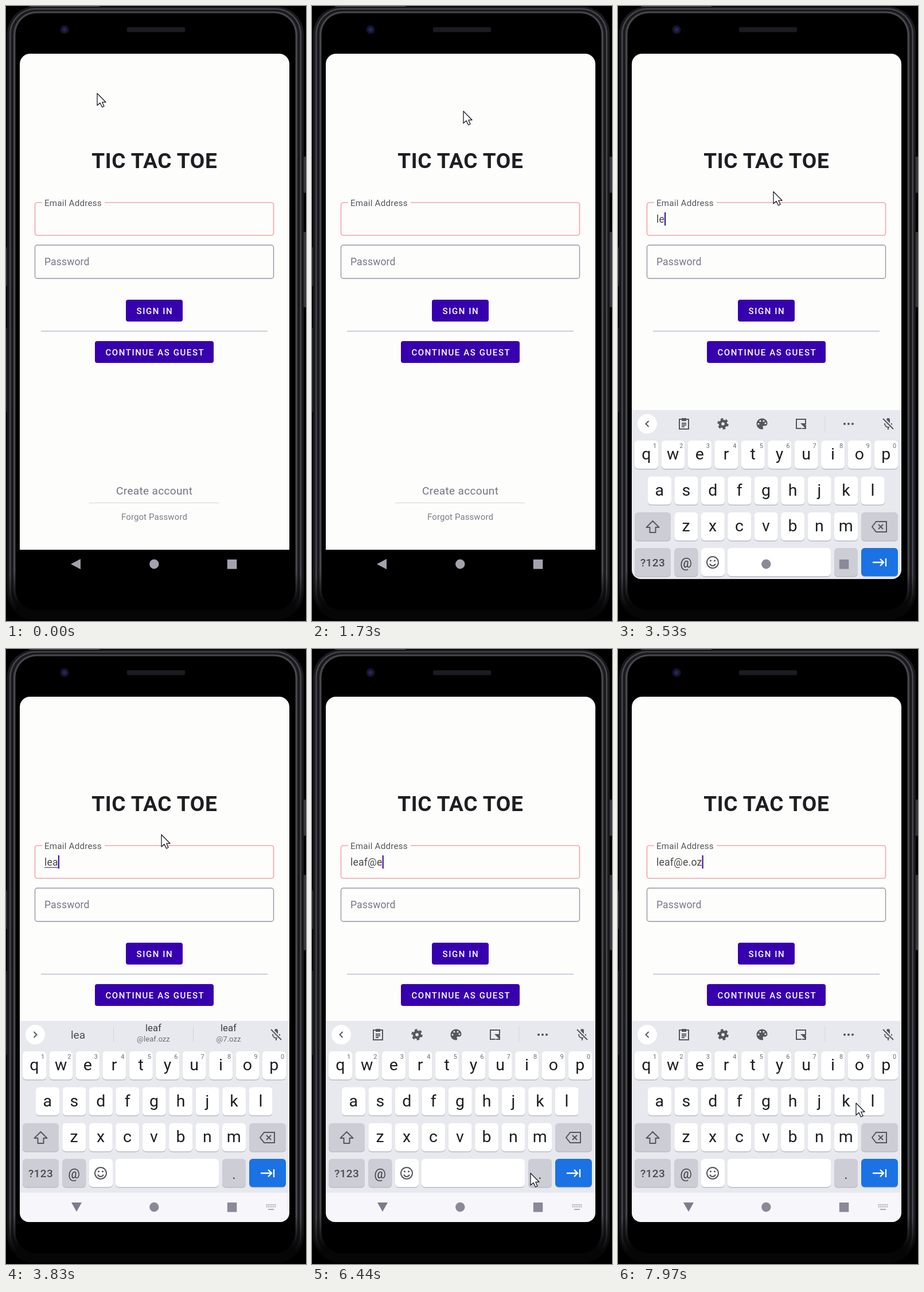
Recreate the animation shown at these times as an HTML page. Size 523 by 1070 pixels, loop 8000 ms.

```html
<!DOCTYPE html>
<html lang="en">
<head>
<meta charset="utf-8">
<title>Sign in</title>
<style>
html, body { margin: 0; width: 100%; height: 100%; overflow: hidden; background: #000; }
svg { display: block; width: 100vw; height: 100vh; }
text { font-family: Roboto, "Open Sans", sans-serif; }
.mid { text-anchor: middle; }
.line { fill: none; stroke: #55575c; stroke-width: 2; }
</style>
</head>
<body>
<svg id="stage" viewBox="0 0 523 1070"></svg>
<script>
const LOOP = 8000;
const stage = document.getElementById('stage');

const rect = (x, y, w, h, r, fill, more = '') =>
  `<rect x="${x}" y="${y}" width="${w}" height="${h}" rx="${r}" fill="${fill}" ${more}/>`;
const text = (x, y, size, fill, s, more = '') =>
  `<text x="${x}" y="${y}" font-size="${size}" fill="${fill}" ${more}>${s}</text>`;
const mid = (x, y, size, fill, s, more = '') => text(x, y, size, fill, s, 'class="mid" ' + more);
const path = (d, more) => `<path d="${d}" ${more}/>`;
const group = (id, body, more = '') => `<g id="${id}" ${more}>${body}</g>`;
const at = (x, y, body) => `<g transform="translate(${x} ${y})">${body}</g>`;

function phone() {
  return rect(0, 0, 523, 1070, 0, '#000') +
    rect(519, 262, 4, 63, 1, '#38383e') + rect(519, 393, 4, 131, 1, '#38383e') +
    rect(0, 420, 1.5, 67, 0, '#33333a') + rect(0, 560, 1.5, 146, 0, '#26262c') +
    rect(40, 0, 123, 1, 0, '#55555c') +
    rect(2, 1, 517, 1067, 48, 'url(#edge)') +
    rect(6, 4, 509, 1060, 45, 'url(#rim)') +
    rect(8.5, 6, 504, 1055, 43, 'url(#edge)') +
    rect(13, 9.5, 495, 1046, 40, 'url(#rim)') +
    rect(16.5, 12.5, 488, 1039, 37, '#000') +
    '<circle cx="102" cy="41" r="7.5" fill="#14142e"/><circle cx="102" cy="41" r="3.5" fill="#26265a"/>' +
    rect(211, 37, 101, 8.5, 2, '#1b1b22');
}

function button(x, y, w, label) {
  return rect(x, y, w, 38, 4, '#3700ae') +
    text(x + 18.5, y + 24.5, 15, '#fff', label, 'font-weight="500" letter-spacing="1.57"');
}

function form() {
  return path('M24 946V101a18 18 0 0 1 18-18H476a18 18 0 0 1 18 18V946Z', 'fill="#fdfdfc"') +
    mid(258.8, 282, 37, '#1e1e22', 'TIC TAC TOE', 'font-weight="700" letter-spacing=".6"') +
    rect(50.5, 342, 416, 57, 4, 'none', 'stroke="#f2a9a9" stroke-width="1.7"') +
    rect(63, 339, 109, 6, 0, '#fdfdfc') +
    text(67, 347.5, 15.2, '#55555c', 'Email Address', 'letter-spacing=".2"') +
    rect(50.5, 416, 416, 58, 4, 'none', 'stroke="#9696a6" stroke-width="1.4"') +
    text(67, 451, 17.6, '#777789', 'Password', 'letter-spacing=".1"') +
    button(209, 511, 99, 'SIGN IN') +
    rect(61, 565, 395, 1.3, 0, '#b4b4c6') +
    button(155, 583, 207, 'CONTINUE AS GUEST') +
    mid(258.7, 850, 19, '#747486', 'Create account', 'letter-spacing=".35"') +
    rect(145, 864, 226, 1, 0, '#d6d6de') +
    mid(258.5, 894, 15, '#7c7c88', 'Forgot Password', 'letter-spacing=".1"');
}

function key(x, y, w, fill = '#fff') {
  return rect(x, y + 1.5, w, 49, 6, '#b9bbc4') + rect(x, y, w, 49, 6, fill);
}

function letters(row, x, y, digits) {
  return [...row].map((c, i) => {
    const kx = x + i * 46.45;
    return key(kx, y, 41) + mid(kx + 20.3, y + 33, 28.5, '#1d1e22', c) +
      (digits ? mid(kx + 35, y + 13, 11, '#6a6b74', (i + 1) % 10) : '');
  }).join('');
}

const chevron = dir => at(51, 671, '<circle r="17" fill="#fff"/>' +
  path(`M${2.5 * dir * -1} -5L${2.5 * dir} 0L${2.5 * dir * -1} 5`, 'class="line"'));

function tools() {
  const dark = 'fill="#55575c"';
  return chevron(-1) +
    at(115, 671, path('M-8 -8H8V9H-8Z', 'class="line"') + path('M-4 -10H4V-5H-4Z', dark) +
      path('M-4 -1H4M-4 2H4M-4 5H1', 'class="line" stroke-width="1.5"')) +
    at(183, 671, '<circle r="5" class="line" style="stroke-width:4.5"/>' +
      '<circle r="8" class="line" style="stroke-width:3.5" stroke-dasharray="4.4 3.98"/>') +
    at(251, 671, path('M0 -9.5C-5.5 -9.5 -9.5 -5 -9.5 0S-5.5 9.5 0 9.5C3 9.5 2 6.5 1.5 5.5C1 4 2 3.5 3 3.5H5C8 3.5 9.5 1.5 9.5 -1C9.5 -6 5.5 -9.5 0 -9.5Z', dark) +
      [[-6, 0], [-3, -5], [3, -5], [6, -1]].map(p => `<circle cx="${p[0]}" cy="${p[1]}" r="1.6" fill="#e8eaed"/>`).join('')) +
    at(319, 671, path('M8 1V-8H-8V8H1', 'class="line"') + path('M-1 -1H8V8Z', dark) + path('M8 2V8H2', 'class="line"')) +
    rect(360.5, 657, 1, 27, 0, '#d4d5dc') +
    [395, 402, 409].map(x => `<circle cx="${x}" cy="671" r="2.1" ${dark}/>`).join('');
}

function hints() {
  const pair = (x, sub) => mid(x, 665, 16.8, '#3c3d42', 'leaf') + mid(x, 683, 13.2, '#6d6e76', sub);
  return chevron(1) + mid(125.5, 678, 19, '#4a4b52', '', 'id="hint"') +
    rect(187, 658, 1, 26, 0, '#cfd0d8') + pair(257, '@leaf.ozz') +
    rect(326, 658, 1, 26, 0, '#cfd0d8') + pair(388, '@7.ozz');
}

function keyboard() {
  const grey = '#cccdd5';
  return rect(24, 647, 470, 300, 0, '#e8e9ee') + rect(24, 946, 470, 52, 0, '#f7f7fb') +
    group('tools', tools()) + group('hints', hints()) +
    at(471, 671, rect(-3, -10, 6, 12, 3, '#55575c') +
      path('M-6 -1C-6 8 6 8 6 -1M0 6V10', 'class="line"') +
      path('M-8 -9L9 9', 'stroke="#e8e9ee" stroke-width="5"') + path('M-9 -9L9 9', 'class="line"')) +
    letters('qwertyuiop', 29, 700, true) +
    letters('asdfghjkl', 52, 762.5) +
    key(29, 825, 63, grey) + letters('zxcvbnm', 98.3, 825) + key(424, 825, 64, grey) +
    at(60.5, 850, path('M0 -10L11 1H5V10H-5V1H-11Z', 'class="line" stroke-linejoin="round"')) +
    at(456, 850, path('M-13 0L-6 -9H12V9H-6ZM-2 -4L6 4M6 -4L-2 4', 'class="line"')) +
    key(29, 887, 63, grey) + mid(60.5, 919, 19, '#4a4b52', '?123', 'font-weight="500" letter-spacing=".4"') +
    key(98.3, 887, 41, grey) + mid(118.5, 921, 23, '#3f4046', '@') +
    key(145, 887, 41) +
    at(165, 912, '<circle r="10" class="line"/><circle cx="-3.5" cy="-3" r="1.6" fill="#55575c"/><circle cx="3.5" cy="-3" r="1.6" fill="#55575c"/>' +
      path('M-5 2.5C-3 7 3 7 5 2.5', 'class="line"')) +
    key(191, 887, 180) + key(377, 887, 41, grey) + mid(397.5, 922, 24, '#3f4046', '.') +
    key(424, 887, 64, '#1b72e4') +
    at(456, 912, path('M-12 0H7M1 -6L7 0L1 6M11 -7V7', 'fill="none" stroke="#fff" stroke-width="2.3"'));
}

function nav() {
  const dots = [0, 1, 2, 3, 4, 5].map(i => [0, 1].map(j => rect(453.5 + i * 3, 966 + j * 3.4, 2, 2, 0, '#a9a9b8')).join('')).join('');
  return path('M113 971L130 962V980Z', 'id="back" fill="#a5a2ae"') +
    path('M114 963H132L123 979Z', 'id="down" fill="#7d7b8c"') +
    group('homes', '<circle cx="258.3" cy="971" r="8.2"/><rect x="385.8" y="963" width="16.5" height="16.5"/>') +
    group('kbIcon', dots + rect(457, 974, 10, 2, 0, '#a9a9b8'));
}

const fade = (id, color) => `<linearGradient id="${id}" x1="0" y1="0" x2="0" y2="1">
  <stop offset=".93" stop-color="${color}"/><stop offset=".985" stop-color="#060607"/></linearGradient>`;

stage.innerHTML =
  `<defs>${fade('edge', '#1a1a1e')}${fade('rim', '#46464c')}
  <clipPath id="screen"><rect x="24" y="83" width="470" height="914" rx="16"/></clipPath></defs>` +
  phone() + form() +
  text(67, 377, 17.6, '#46464c', '', 'id="typed" letter-spacing=".2"') +
  rect(67, 379.5, 0, 1.2, 0, '#46464c', 'id="under"') +
  rect(0, 359, 2.2, 23, 0, '#4a10a8', 'id="caret"') +
  `<g clip-path="url(#screen)">${group('kb', keyboard())}</g>` + nav() +
  path('M0 0V21L5 16.6L8.6 24L12 22.4L8.8 15.3H15Z', 'id="mouse" fill="#fff" stroke="#1c1c26" stroke-width="1.3" stroke-linejoin="round"');

const el = Object.fromEntries([...stage.querySelectorAll('[id]')].map(e => [e.id, e]));
const show = (e, on) => e.setAttribute('visibility', on ? 'inherit' : 'hidden');

const address = 'leaf@e.oz';
const strokes = [3370, 3490, 3800, 4100, 5500, 6000, 6600, 7060, 7640];
const composing = [3800, 5500];
const slide = { start: 3401, length: 285, height: 350 };

// time, x, y of the pointer
const trail = [
  [0, 159, 152], [960, 263, 159], [1500, 263, 159], [2450, 271, 323], [4930, 271, 323],
  [5100, 100, 437], [5400, 112, 905], [5560, 112, 905], [5880, 72, 788], [6040, 72, 788],
  [6400, 381, 912], [6640, 381, 912], [6950, 211, 850], [7100, 211, 850],
  [7420, 414, 728], [7720, 414, 728], [7970, 415, 790], [8000, 415, 795]
];

function pointer(t) {
  const i = Math.max(1, trail.findIndex(p => p[0] > t));
  const [a, b] = [trail[i - 1], trail[i]];
  const p = (t - a[0]) / (b[0] - a[0]);
  const s = p * p * (3 - 2 * p);
  return [a[1] + (b[1] - a[1]) * s, a[2] + (b[2] - a[2]) * s];
}

function draw(t) {
  const count = strokes.filter(s => s <= t).length;
  el.typed.textContent = address.slice(0, count);
  const width = count ? el.typed.getComputedTextLength() : 0;
  const held = t - strokes[count - 1];
  show(el.caret, count > 0 && held % 1000 < 500);
  el.caret.setAttribute('x', 67 + width);

  const compose = t >= composing[0] && t < composing[1];
  el.under.setAttribute('width', compose ? width : 0);
  show(el.hints, compose);
  show(el.tools, !compose);
  el.hint.textContent = address.slice(0, t < 4170 ? 3 : 4);

  const p = Math.min(1, Math.max(0, (t - slide.start) / slide.length));
  const open = p > 0;
  show(el.kb, open);
  el.kb.setAttribute('transform', `translate(0 ${Math.round(slide.height * (1 - p) ** 3)})`);
  show(el.back, !open);
  show(el.down, p === 1);
  show(el.kbIcon, p === 1);
  el.homes.setAttribute('fill', open ? '#8b8997' : '#a5a2ae');

  el.mouse.setAttribute('transform', `translate(${pointer(t).map(Math.round).join(' ')})`);
}

const begin = performance.now();
function tick() {
  draw((performance.now() - begin) % LOOP);
  requestAnimationFrame(tick);
}
tick();
</script>
</body>
</html>
```
